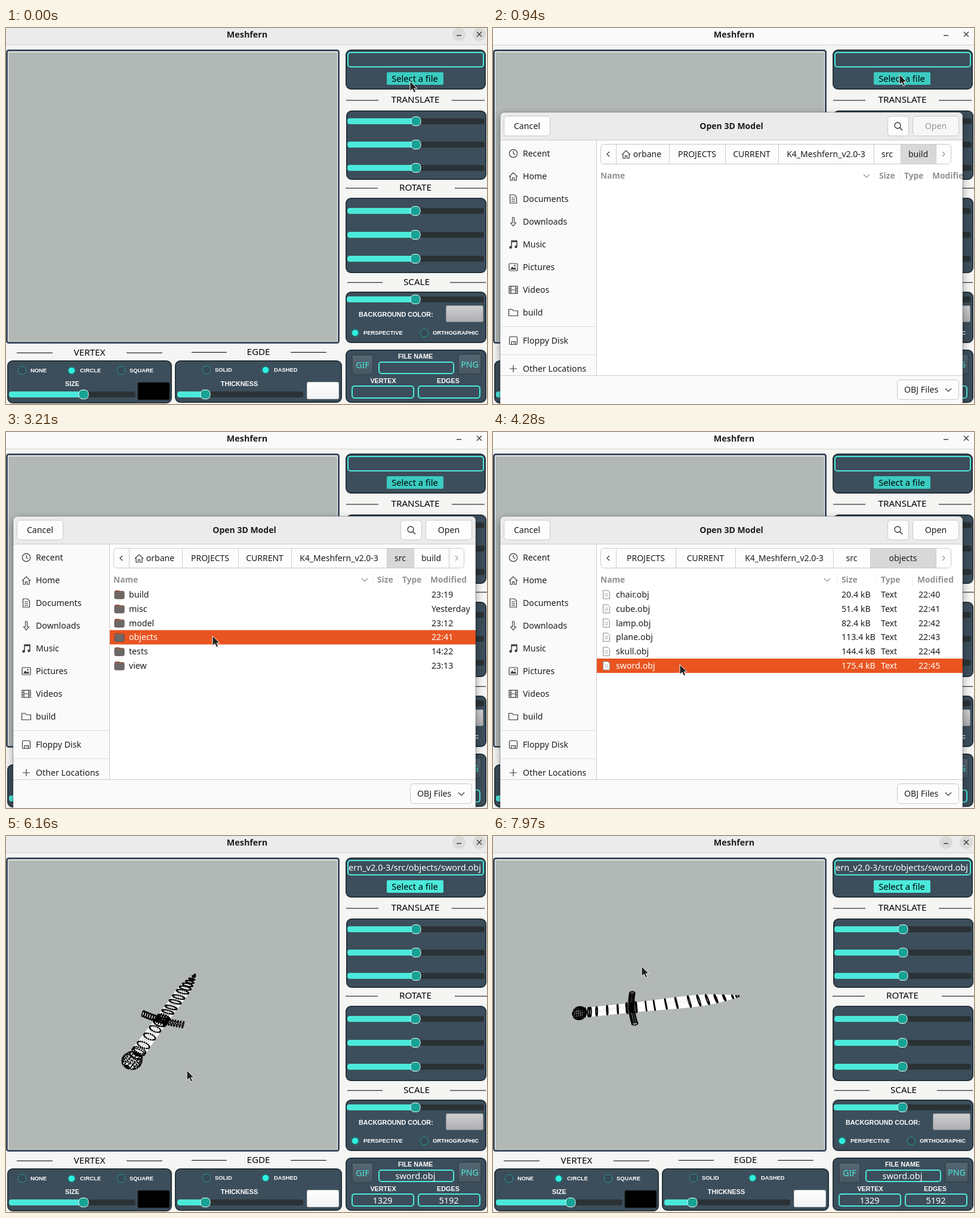
An HTML page with a canvas that plays this animation: 806x629 px, repeating every 8 s.

```html
<!DOCTYPE html>
<html lang="en">
<head>
<meta charset="utf-8">
<title>Meshfern</title>
<style>
html, body { margin: 0; width: 100%; height: 100%; overflow: hidden; background: #f5f5f4; }
svg, canvas { position: absolute; left: 0; top: 0; width: 806px; height: 629px; overflow: hidden; }
text { font: 14.2px "Noto Sans", "Open Sans", sans-serif; fill: #1d1d1d; white-space: pre; }
text.cap { font: bold 10.8px "Liberation Sans", Arial, sans-serif; fill: #fff; }
text.opt { font: bold 9.4px "Liberation Sans", Arial, sans-serif; fill: #fff; }
text.sec { font-size: 15.2px; fill: #000; }
text.val { font-size: 14.5px; fill: #fff; }
text.teal { font-size: 14.2px; fill: #4be9da; }
text.bold { font-weight: bold; font-size: 14.3px; }
text.head { font-weight: bold; font-size: 13.8px; fill: #929292; }
</style>
</head>
<body>
<svg id="app" viewBox="0 0 806 629"></svg>
<canvas id="model" width="806" height="629"></canvas>
<svg id="top" viewBox="0 0 806 629"></svg>
<script>
const $ = id => document.getElementById(id);
const TEAL = '#4be9da';

// Markup helpers
const box = (x, y, x2, y2, fill, stroke = 'none', r = 0, w = 1, more = '') =>
  `<rect x="${x}" y="${y}" width="${x2 - x}" height="${y2 - y}" rx="${r}" fill="${fill}" stroke="${stroke}" stroke-width="${w}" ${more}/>`;
const text = (x, y, str, cls = '', anchor = 'start', more = '') =>
  `<text x="${x}" y="${y}" class="${cls}" text-anchor="${anchor}" ${more}>${str}</text>`;
const mid = (x, y, str, cls, more) => text(x, y, str, cls, 'middle', more);
const path = (d, stroke = '#3a3a3a', fill = 'none', w = 1.2, more = '') =>
  `<path d="${d}" fill="${fill}" stroke="${stroke}" stroke-width="${w}" ${more}/>`;
const circle = (x, y, r, fill, stroke = 'none', w = 1) =>
  `<circle cx="${x}" cy="${y}" r="${r}" fill="${fill}" stroke="${stroke}" stroke-width="${w}"/>`;
const group = (id, body, more = '') => `<g id="${id}" ${more}>${body}</g>`;
const at = (x, y, body) => `<g transform="translate(${x} ${y})">${body}</g>`;
const fade = (id, a, b) =>
  `<linearGradient id="${id}" x2="0" y2="1"><stop stop-color="${a}"/><stop offset="1" stop-color="${b}"/></linearGradient>`;

const panel = (x, y, x2, y2) => box(x, y, x2, y2, '#3c4e5b', '#25323a', 8, 2);
const field = (x, y, x2, y2) => box(x, y, x2, y2, '#3c4e5b', TEAL, 4, 2);
const slider = (x, x2, y, h) =>
  box(x, y - 5, x2, y + 5, '#2b3235', 'none', 4) + box(x, y - 5, h, y + 5, TEAL, 'none', 4) +
  box(h - 8, y - 7.5, h + 8, y + 7.5, '#17a296', '#effffd', 6);
const radio = (x, y, label, on, tx) =>
  circle(x, y, 6.7, '#364854', on ? '#1f7f7b' : '#219c94', 1) +
  (on ? circle(x, y, 5.3, '#2df0e0') : '') + text(tx, y + 3.4, label, 'opt');
const section = (x, y, label, l1, l2, r1, r2, ly) =>
  mid(x, y + 5.4, label, 'sec') + path(`M${l1} ${ly}H${l2}M${r1} ${ly}H${r2}`, '#000', 'none', 1.1);

function appMarkup() {
  return `<defs>${fade('gray', '#cfcfd1', '#aeaeb1')}${fade('snow', '#ffffff', '#f2f2f2')}${fade('slate', '#566773', '#465662')}
    <clipPath id="pathClip">${box(575, 42, 799, 64, '#000')}</clipPath></defs>` +
    box(0, 0, 806, 629, '#f5f5f4') +
    box(0, 0, 806, 28, '#ebebeb', 'none', 0, 0, 'id="bar"') + path('M0 28.5H806', '#d2d2d0', 'none', 1) +
    group('rounds', circle(759, 10.5, 11, '#dadad9') + circle(793, 10.5, 11, '#dadad9')) +
    path('M755 12.5H763', '#333', 'none', 1.4) + path('M789 6.5L797 14.5M797 6.5L789 14.5', '#333', 'none', 1.3) +
    mid(404, 16, 'Meshfern', 'bold', 'fill="#333"') +
    box(1.5, 37.5, 557.5, 526.5, '#fff', '#3c4c5e', 3, 3) + box(4, 40.5, 555, 524.5, '#b2b8b5') +

    panel(570, 37, 803, 102) + field(573, 41, 800, 65) +
    box(638, 74, 733, 95, TEAL, 'none', 2, 0, 'id="pick"') + mid(685, 90, 'Select a file', '', 'style="font-size:14.7px;fill:#000"') +
    section(686, 120, 'TRANSLATE', 570, 624, 747, 802, 121) +
    panel(571, 139, 804, 253) + [156, 195, 234].map(y => slider(572, 802, y, 687)).join('') +
    section(686, 267, 'ROTATE', 569, 623, 752, 806, 268) +
    panel(570, 285, 804, 409) + [306, 346, 386].map(y => slider(572, 801, y, 686)).join('') +
    section(688, 425, 'SCALE', 572, 631, 744, 804, 425.7) +
    panel(570, 442, 804, 526) + slider(571, 801, 454, 686) +
    text(591, 483, 'BACKGROUND COLOR:', 'cap') + box(737.5, 464.5, 799.5, 491.5, 'url(#gray)', '#8f9295', 2) +
    radio(585, 510, 'PERSPECTIVE', 1, 599) + radio(701, 510, 'ORTHOGRAPHIC', 0, 715) +

    panel(570, 539, 804, 626) +
    box(580, 547, 615, 580, 'url(#slate)', '#2b3840', 2) + mid(597.5, 569, 'GIF', 'teal') +
    box(758, 546, 796, 579, 'url(#slate)', '#2b3840', 2) + mid(777, 568, 'PNG', 'teal') +
    mid(686, 553, 'FILE NAME', 'cap') + field(625, 559, 750, 578) +
    mid(632, 594, 'VERTEX', 'cap') + field(580, 599, 683, 619) +
    mid(741, 594, 'EDGES', 'cap') + field(691, 599, 794, 619) +

    section(140, 543, 'VERTEX', 18, 78, 202, 262, 543.5) +
    panel(3, 557, 277, 627) +
    radio(27, 573, 'NONE', 0, 41) + radio(110, 573, 'CIRCLE', 1, 124) + radio(193, 573, 'SQUARE', 0, 207) +
    mid(111, 599, 'SIZE', 'cap') + slider(5, 217, 613, 130) + box(221, 593, 274, 622, '#000', '#1d2225', 2) +
    section(423, 542, 'EGDE', 311, 370, 477, 537, 542.5) +
    panel(284, 557, 562, 626) +
    radio(336, 572, 'SOLID', 0, 350) + radio(435, 572, 'DASHED', 1, 449) +
    mid(391, 599, 'THICKNESS', 'cap') + slider(287, 498, 613, 334) + box(504.5, 592.5, 557.5, 620.5, 'url(#snow)', '#c9cccd', 2) +

    group('loaded',
      `<g clip-path="url(#pathClip)">${text(796, 58, 'Meshfern_v2.0-3/src/objects/sword.obj', 'val', 'end')}</g>` +
      mid(686, 574, 'sword.obj', 'val') + mid(631, 615, '1329', 'val') + mid(742, 615, '5192', 'val'));
}

const icons = {
  home: path('M-7 1L0-6 7 1M-5 0V7H-1.5V2.5H1.5V7H5V0'),
  clock: circle(0, 0, 6.7, 'none', '#3a3a3a', 1.2) + path('M0-4V0L3 2'),
  doc: path('M-5.5-7H2L5.5-3.5V7H-5.5ZM-3-2H3M-3 1H3M-3 4H3'),
  down: path('M-1.5-7H1.5V2H4.5L0 7.3-4.5 2H-1.5Z', '#3a3a3a', 'none', 1.1),
  note: path('M-3 5V-6H6V3.5M-3-4.5H6', '#3a3a3a', 'none', 1.5) + circle(-4.5, 5, 2.2, '#3a3a3a') + circle(4.5, 4, 2.2, '#3a3a3a'),
  image: box(-7, -6, 7, 6, 'none', '#3a3a3a', 1, 1.2) + path('M-5 4L-2-1 1 2 3 0 5 4Z', 'none', '#3a3a3a') + circle(2.5, -2.5, 1.3, '#3a3a3a'),
  film: box(-7, -6, 7, 6, 'none', '#3a3a3a', 0, 1.2) + path('M-4-6V6M4-6V6M-4 0H4M-7-2H-4M-7 2H-4M4-2H7M4 2H7'),
  folder: path('M-7.5 5.5V-5.5H-2L0-3H7.5V5.5Z'),
  disk: box(-6.5, -6.5, 6.5, 6.5, 'none', '#3a3a3a', 1.5, 1.2) + path('M-3 6.5V1.5H3.5V6.5M1 3V5'),
  plus: path('M-6 0H6M0-6V6')
};
const places = [['clock', 'Recent', 210], ['home', 'Home', 248], ['doc', 'Documents', 286], ['down', 'Downloads', 324],
  ['note', 'Music', 362], ['image', 'Pictures', 400], ['film', 'Videos', 438], ['folder', 'build', 476],
  ['disk', 'Floppy Disk', 523], ['plus', 'Other Locations', 570]];

const button = (x, y, x2, y2, id = '') => box(x + .5, y + .5, x2 - .5, y2 - .5, '#fdfdfd', '#cbc8c5', 5, 1, id && `id="${id}"`);

// Path bar: edges of the cells, labels, index of the open folder
function crumbs(edges, labels, active) {
  let s = button(180, 194, 768, 228);
  labels.forEach((label, i) => {
    const a = edges[i], b = edges[i + 1], home = label === 'orbane';
    if (i === active) s += box(a, 195, b, 227, '#d8d8d8');
    if (home) s += at(223, 211, icons.home);
    s += mid((a + b) / 2 + (home ? 8 : 0), 216, label, '', 'style="font-size:14px"');
  });
  return s + path(edges.map(x => `M${x + .5} 195V227`).join(''), '#cfccc9', 'none', 1) +
    path('M195 207L191 211 195 215', '#333') + path('M753 207L757 211 753 215', '#999');
}
const columns = (arrow, cols) => text(180, 252, 'Name', 'head') +
  path(`M${arrow - 5} 245L${arrow} 250 ${arrow + 5} 245`, '#929292') +
  cols.map(([x, label]) => text(x, 252, label, 'head') + path(`M${x - 7.5} 236V258`, '#f1f1f1', 'none', 1)).join('');

const folderIcon = box(-8, -7, 1, 0, '#a4553b', 'none', 2) + box(-8, -5.5, 8, 7, '#6d6866', '#55504e', 2) + path('M-7-4.5H7', '#b8644a', 'none', 1);
const fileIcon = path('M-5.5-7H2.5L5.5-4V7H-5.5Z', '#8d8d8d', '#fafafa', 1) + path('M-3-1H3M-3 2H3', '#aaa', 'none', 1);
const row = (key, i, icon, cells) => {
  const y = 272 + 23.8 * i;
  return group(key + i, box(174, y - 12, 787, y + 12, 'none') + at(190, y, icon) +
    cells.map(([x, str]) => text(x, y + 5, str)).join(''));
};

const edges = [206, 295, 389, 478, 638, 683, 742];
const labels = ['orbane', 'PROJECTS', 'CURRENT', 'K4_Meshfern_v2.0-3', 'src', 'build'];
const dirs = ['build', 'misc', 'model', 'objects', 'tests', 'view'];
const times = ['23:19', 'Yesterday', '23:12', '22:41', '14:22', '23:13'];
const files = ['chair', 'cube', 'lamp', 'plane', 'skull', 'sword'];

function dialogMarkup() {
  const empty = crumbs(edges, labels, 5) + columns(626, [[647, 'Size'], [689, 'Type'], [736, 'Modified']]);
  const src = crumbs(edges, labels, 4) + columns(601, [[622, 'Size'], [664, 'Type'], [711, 'Modified']]) +
    dirs.map((d, i) => row('dir', i, folderIcon, [[206, d], [713, times[i]]])).join('');
  const objects = crumbs([206, 306, 406, 570, 632, 742], ['PROJECTS', 'CURRENT', labels[3], 'src', 'objects'], 4) +
    columns(560, [[584, 'Size'], [650, 'Type'], [711, 'Modified']]) +
    files.map((f, i) => row('obj', i, fileIcon, [[206, f + '.obj'], [584, 20 + i * 31 + '.4 kB'], [650, 'Text'], [713, '22:4' + i]])).join('');
  return `<defs><clipPath id="frame"><path d="M12 640V149Q12 141 20 141H779Q787 141 787 149V640Z"/></clipPath>
    <filter id="soft" x="-10%" y="-10%" width="120%" height="120%"><feGaussianBlur stdDeviation="7"/></filter></defs>` +
    group('dialog',
      box(12, 146, 787, 632, '#000', 'none', 8, 0, 'opacity=".38" filter="url(#soft)"') +
      `<g clip-path="url(#frame)">` +
      box(12, 141, 787, 630, '#fff') + box(12, 141, 787, 187, '#ebebeb') + box(12, 188, 173, 581, '#fafafa') + box(12, 581, 787, 630, '#fafafa') +
      path('M12 187.5H787M173.5 188V581M12 581.5H787', '#cfccc9', 'none', 1) + path('M12 499.5H173M12 546.5H173', '#dedede', 'none', 1) +
      button(18, 147, 96, 181) + mid(57, 169, 'Cancel') + mid(399.5, 169, 'Open 3D Model', 'bold', 'style="font-size:14px"') +
      button(661, 147, 697, 181) + circle(678, 163, 5, 'none', '#333', 1.3) + path('M681.5 166.5L686 171', '#333', 'none', 1.5) +
      button(703, 147, 781, 181, 'openBox') + mid(742, 169, 'Open', '', 'id="openText"') +
      places.map(([icon, name, y]) => at(34, y, icons[icon]) + text(50, y + 5, name)).join('') +
      group('list0', empty) + group('list1', src) + group('list2', objects) +
      button(677, 588, 781, 622) + text(689, 610, 'OBJ Files') + path('M758 603L763 608 768 603', '#333') +
      `</g>` + path('M12 640V149Q12 141 20 141H779Q787 141 787 149V640', 'rgba(0,0,0,.28)', 'none', 1)) +
    group('cursor', path('M0 0V16.5L4 13 6.7 19 9.6 17.7 7 12H12Z', '#f4f4f4', '#222', 1, 'stroke-linejoin="round"'));
}

$('app').innerHTML = appMarkup();
$('top').innerHTML = dialogMarkup();

// Sword: tubes of rings, each vertex as [along axis, along guard, across]
const HALF = 140, DIST = 316, CX = 280, CY = 282;
const ring = (n, fn) => Array.from({ length: n }, (_, i) => fn(Math.cos(i / n * 2 * Math.PI), Math.sin(i / n * 2 * Math.PI)));
const tube = (us, n, wide, deep) => us.map(u => ring(n, (c, s) => [u * HALF, wide(u) * c, deep(u) * s]));
const steps = (n, a, b) => Array.from({ length: n }, (_, i) => a + (b - a) * i / (n - 1));

const bladeWide = u => u < .36 ? 9 + (u + .34) * 4.3 : 12 * (1 - ((u - .36) / .66) ** 2);
const ball = u => Math.sqrt(Math.max(.04, 1 - ((u + .93) / .072) ** 2));
const sword = [
  tube([-.32, -.28, -.17, -.07, .07, .2, .36, .48, .59, .7, .81, .92, .97, 1], 20, bladeWide, u => bladeWide(u) * .3),
  tube([-.87, -.83, -.81, -.74, -.62, -.5, -.4, -.34], 18, () => 8.3, () => 5),
  tube(steps(9, -1, -.86), 16, u => 11.3 * ball(u), u => 8 * ball(u)),
  tube(steps(4, -.39, -.29), 16, () => 10, () => 6),
  steps(17, -32, 32).map(g => ring(9, (c, s) => [-.34 * HALF + 4.4 * c + g * g * .003, g, 4.4 * s]))
];

const norm = v => { const l = Math.hypot(...v); return v.map(c => c / l); };
const dot = (a, b) => a[0] * b[0] + a[1] * b[1] + a[2] * b[2];
const cross = (a, b) => [a[1] * b[2] - a[2] * b[1], a[2] * b[0] - a[0] * b[2], a[0] * b[1] - a[1] * b[0]];

// Linear interpolation in rows of [time, ...values]
function track(rows, t) {
  const i = rows.findIndex(r => r[0] > t);
  if (i < 0) return rows[rows.length - 1].slice(1);
  if (i === 0) return rows[0].slice(1);
  const a = rows[i - 1], b = rows[i], k = (t - a[0]) / (b[0] - a[0]);
  return a.slice(1).map((v, j) => v + (b[j + 1] - v) * k);
}

// Time, axis direction, guard direction
const poses = [
  [5720, 0, -.46, .89, 1, 0, 0],
  [6550, .63, -.45, .64, .74, .42, -.5],
  [6820, .84, -.22, .51, .53, .57, -.64],
  [7400, .99, -.13, -.03, .13, .78, -.6],
  [7970, .985, -.104, .114, .15, .76, -.63]
];
const pointer = [
  [70, 677, 89], [330, 681, 78], [1000, 681, 78], [1750, 658, 208], [2420, 658, 208], [3080, 346, 341],
  [3350, 346, 341], [4080, 313, 389], [5609, 313, 389], [5610, 312, 389], [5720, 312, 389],
  [6550, 296, 395], [6820, 281, 387], [7400, 262, 320], [7970, 249, 218]
];

const ctx = $('model').getContext('2d');
function drawSword(t) {
  const p = track(poses, t), axis = norm(p.slice(0, 3)), raw = p.slice(3), d = dot(raw, axis);
  const guard = norm(raw.map((c, i) => c - d * axis[i])), side = cross(axis, guard);
  const project = v => {
    const [x, y, z] = [0, 1, 2].map(i => axis[i] * v[0] + guard[i] * v[1] + side[i] * v[2]);
    const k = DIST / (DIST + z);
    return [CX + x * k, CY + y * k];
  };
  const tubes = sword.map(rings => rings.map(r => r.map(project)));
  ctx.strokeStyle = '#fff';
  ctx.lineWidth = 1.3;
  ctx.beginPath();
  for (const rings of tubes)
    for (let i = 1; i < rings.length; i++)
      rings[i].forEach((q, j) => { ctx.moveTo(...rings[i - 1][j]); ctx.lineTo(...q); });
  ctx.stroke();
  ctx.fillStyle = '#000';
  ctx.beginPath();
  for (const [x, y] of tubes.flat(2)) { ctx.moveTo(x + 1.35, y); ctx.arc(x, y, 1.35, 0, 7); }
  ctx.fill();
}

const show = (id, on) => $(id).style.display = on ? '' : 'none';
function mark(key, chosen) {
  for (let i = 0; i < 6; i++) {
    const g = $(key + i), on = i === chosen;
    g.firstChild.setAttribute('fill', on ? '#e95420' : 'none');
    g.querySelectorAll('text').forEach(e => e.style.fill = on ? '#fff' : '');
  }
}

function dialogScale(t) {
  if (t < 800 || t >= 5020) return 0;
  if (t >= 4950) return 1 - (t - 4920) / 100;
  return 1 - (1 - Math.min(1, (t - 770) / 120)) ** 2;
}

function draw(t) {
  const loaded = t >= 4950, focus = t < 800 || loaded;
  $('bar').setAttribute('fill', focus ? '#ebebeb' : '#fafafa');
  show('rounds', focus);
  show('loaded', loaded);
  $('pick').setAttribute('fill', loaded ? TEAL : t >= 530 && t < 600 ? '#2fb3aa' : '#3bcbc1');

  ctx.clearRect(0, 0, 806, 629);
  if (loaded) drawSword(t);

  const s = dialogScale(t), list = t < 2050 ? 0 : t < 3380 ? 1 : 2;
  show('dialog', s > 0);
  $('dialog').setAttribute('transform', `translate(0 ${386 * (1 - s)}) scale(1 ${s})`);
  $('dialog').setAttribute('opacity', s);
  for (let i = 0; i < 3; i++) show('list' + i, i === list);
  mark('dir', t < 3140 ? 0 : 3);
  mark('obj', t < 4280 ? 0 : 5);
  $('openText').style.fill = list ? '' : '#979797';
  $('openBox').setAttribute('fill', t >= 4680 ? '#dcdad8' : list ? '#fdfdfd' : '#f7f7f7');

  const [x, y] = track(pointer, t);
  $('cursor').setAttribute('transform', `translate(${Math.round(x)} ${Math.round(y)})`);
}

const start = performance.now();
function tick() {
  draw((performance.now() - start) % 8000);
  requestAnimationFrame(tick);
}
tick();
</script>
</body>
</html>
```
